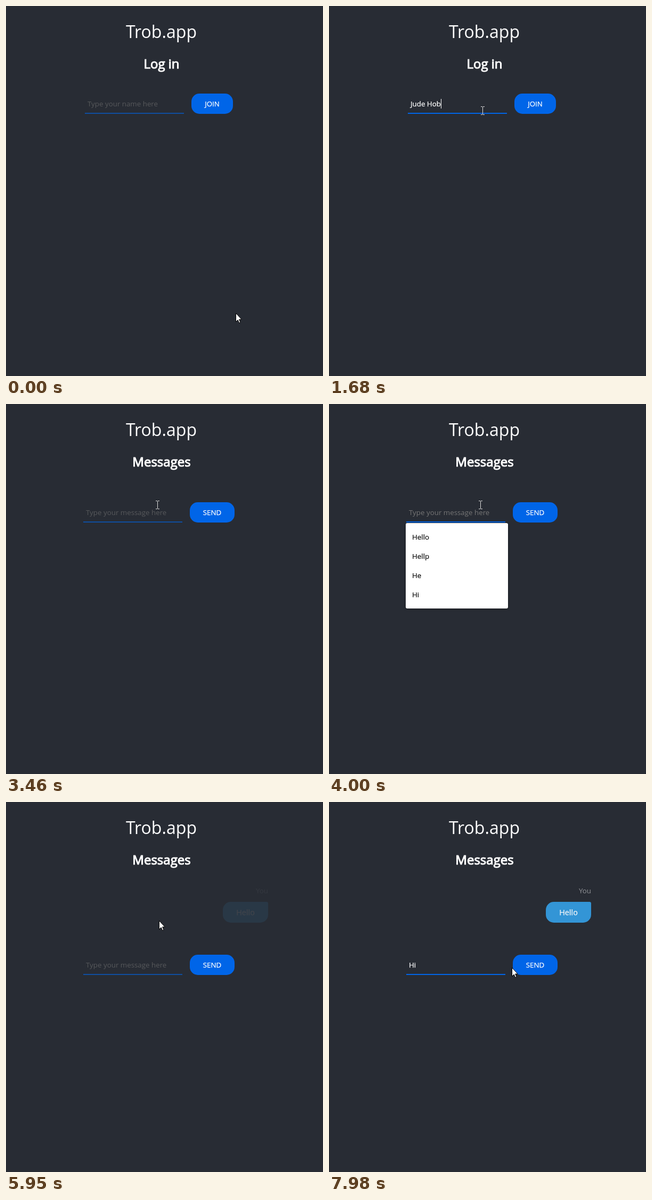
An HTML page that plays this animation: 595 px wide and 693 px high, repeating every 8 s.

```html
<!DOCTYPE html>
<html lang="en">
<head>
<meta charset="utf-8">
<title>Trob.app</title>
<style>
  html, body { margin: 0; width: 100%; height: 100%; overflow: hidden; background: #282c34; }
  svg { display: block; }
  text { font: 13.333px "Open Sans", sans-serif; fill: #fff; white-space: pre; }
  .mid { text-anchor: middle; }
  .end { text-anchor: end; }
  #title { font-size: 32px; }
  #heading { font-size: 24px; stroke: #fff; stroke-width: 1.1; }
  #label, #value, #said { stroke: #fff; stroke-width: .25; }
  #you { fill: #94969a; }
  #said { font-size: 14.4px; }
  #hint { fill: #757575; }
  #popup { filter: drop-shadow(0 1px 2px rgba(0, 0, 0, .4)); }
  #popup text { fill: #000; stroke: #000; stroke-width: .15; }
  .blue { fill: #0065e8; }
</style>
</head>
<body>
<svg width="595" height="693" viewBox="0 0 595 693">
  <text id="title" class="mid" x="291.5" y="60">Trob.app</text>
  <text id="heading" class="mid" x="292" y="117"></text>

  <g id="message">
    <text id="you" class="end" x="492" y="171">You</text>
    <path fill="#3498db" d="M422 187H489a3 3 0 0 1 3 3V211a15 15 0 0 1-15 15H422a15 15 0 0 1-15-15V202a15 15 0 0 1 15-15Z"/>
    <text id="said" class="mid" x="449.5" y="212">Hello</text>
  </g>

  <g id="field">
    <rect class="blue" y="36" width="186" height="2"/>
    <text id="hint" x="5" y="24"></text>
    <text id="value" x="5" y="24"></text>
    <rect id="caret" y="10" width="1" height="18" fill="#fff"/>
  </g>
  <g id="button">
    <rect id="pill" class="blue" height="38" rx="15"/>
    <text id="label" class="mid" y="24"></text>
  </g>
  <g id="popup">
    <rect id="sheet" width="192" rx="3" fill="#fff"/>
    <text x="12" y="31"></text><text x="12" y="67"></text>
    <text x="12" y="103"></text><text x="12" y="139"></text>
  </g>

  <g id="pointer">
    <path id="arrow" fill="#fff" stroke="#000" d="M.5.5V16.5L4.2 13L6.6 18.6L9 17.6L6.6 12H11.3Z"/>
    <path id="beam" fill="none" stroke="#ddd" d="M-3 -8.5H0M1 -8.5H4M-3 6.5H0M1 6.5H4M.5 -8V6"/>
    <path id="hand" fill="#fff" stroke="#000" stroke-linejoin="round"
      d="M-1.5 12V2L-1 .9H.5L1.5 2V7.5L2.5 6.6H4L5 8L6 7.4H7.3L8.3 9L9.3 8.6L10.5 10V14.5L8.5 18V21.5H0V18.5L-5.7 12.5V10.5L-4.3 9.7L-2.8 10.6Z"/>
  </g>
</svg>
<script>
const LOOP = 8000, JOIN = 2350, SEND = 5620;
const el = id => document.getElementById(id);
const show = (id, on) => el(id).setAttribute('display', on ? 'inline' : 'none');
const place = (id, x, y) => el(id).setAttribute('transform', `translate(${x} ${y})`);
const clamp = v => Math.min(1, Math.max(0, v));

// Field content over time: null = not focused
const edits = [
  [0, null], [430, ''], [610, 'J'], [760, 'Ju'], [910, 'Jud'], [990, 'Jude'],
  [1140, 'Jude '], [1290, 'Jude H'], [1520, 'Jude Ho'], [1680, 'Jude Hob'], [JOIN, null],
  [3500, ''], [4170, 'H'], [4310, 'He'], [4460, 'Hel'], [4550, 'Hell'], [4700, 'Hello'], [SEND, null],
  [6500, ''], [6960, 'H'], [7190, 'Hi']
];

// Pointer stops: time, x, y
const stops = [
  [70, 431, 575], [430, 288, 197], [1880, 288, 197], [2250, 362, 185], [2560, 362, 185],
  [2620, 365, 185], [2900, 365, 185], [3400, 284, 190], [5200, 284, 190], [5530, 372, 200],
  [5660, 372, 200], [5950, 287, 222], [5980, 287, 222], [6340, 235, 308], [7720, 235, 308], [7980, 343, 310]
];

const screens = {
  login: { heading: 'Log in', hint: 'Type your name here', label: 'JOIN', x: 148, bx: 348, bw: 78 },
  chat: { heading: 'Messages', hint: 'Type your message here', label: 'SEND', x: 145, bx: 345, bw: 84 }
};

const smooth = p => p * p * (3 - 2 * p);

// CSS "ease" curve
function ease(p) {
  let lo = 0, hi = 1;
  for (let i = 0; i < 20; i++) {
    const s = (lo + hi) / 2, r = 1 - s;
    if (.75 * s * r + s ** 3 < p) lo = s; else hi = s;
  }
  const r = 1 - lo;
  return .3 * lo * r * r + 3 * lo * lo * r + lo ** 3;
}

function pointerAt(t) {
  const i = stops.findIndex(s => s[0] > t);
  if (i < 1) return stops[i ? stops.length - 1 : 0].slice(1);
  const [t0, x0, y0] = stops[i - 1], [t1, x1, y1] = stops[i];
  const p = smooth((t - t0) / (t1 - t0));
  return [Math.round(x0 + (x1 - x0) * p), Math.round(y0 + (y1 - y0) * p)];
}

function suggestions(login, value) {
  const list = login ? ['Jude Hob', 'Jude']
    : value ? ['Hello', 'He', 'Hellp', 'Hi'] : ['Hello', 'Hellp', 'He', 'Hi'];
  const hits = list.filter(s => s.startsWith(value));
  return hits.length === 1 && hits[0] === value ? [] : hits;
}

function render(t) {
  const login = t < JOIN, sent = t >= SEND;
  const s = login ? screens.login : screens.chat;
  const y = login ? 164 : sent ? 286 : 184;
  const past = edits.filter(e => e[0] <= t);
  const [editTime, text] = past[past.length - 1];
  const focused = text !== null, value = text || '';
  const focusTime = focused ? past.filter(e => e[1] === '').pop()[0] : t;

  el('heading').textContent = s.heading;
  el('hint').textContent = value ? '' : s.hint;
  el('value').textContent = value;
  el('label').textContent = s.label;

  place('field', s.x, y);
  el('field').setAttribute('opacity', .6 + .4 * clamp((t - focusTime) / 300));
  show('caret', focused && (t - editTime) % 1000 < 500);
  el('caret').setAttribute('x', 5 + Math.round(value ? el('value').getComputedTextLength() : 0));

  place('button', s.bx, y);
  el('pill').setAttribute('width', s.bw);
  el('label').setAttribute('x', s.bw / 2);

  const open = focused && (login ? value : t >= focusTime + 60);
  const items = open ? suggestions(login, value) : [];
  show('popup', items.length);
  place('popup', login ? 148 : 144, y + (sent ? 40 : 39));
  el('sheet').setAttribute('height', items.length * 36 + 16);
  el('popup').querySelectorAll('text').forEach((n, i) => n.textContent = items[i] || '');

  show('message', sent);
  el('message').setAttribute('opacity', ease(clamp((t - SEND) / 3000)));

  const [px, py] = pointerAt(t);
  const over = (x, w) => px >= x && px < x + w && py >= y && py < y + 38;
  const kind = over(s.x, 186) ? 'beam' : over(s.bx, s.bw) ? 'hand' : 'arrow';
  for (const k of ['arrow', 'beam', 'hand']) show(k, k === kind);
  place('pointer', px, py);
}

const start = performance.now();
function tick() {
  render((performance.now() - start) % LOOP);
  requestAnimationFrame(tick);
}
tick();
</script>
</body>
</html>
```
